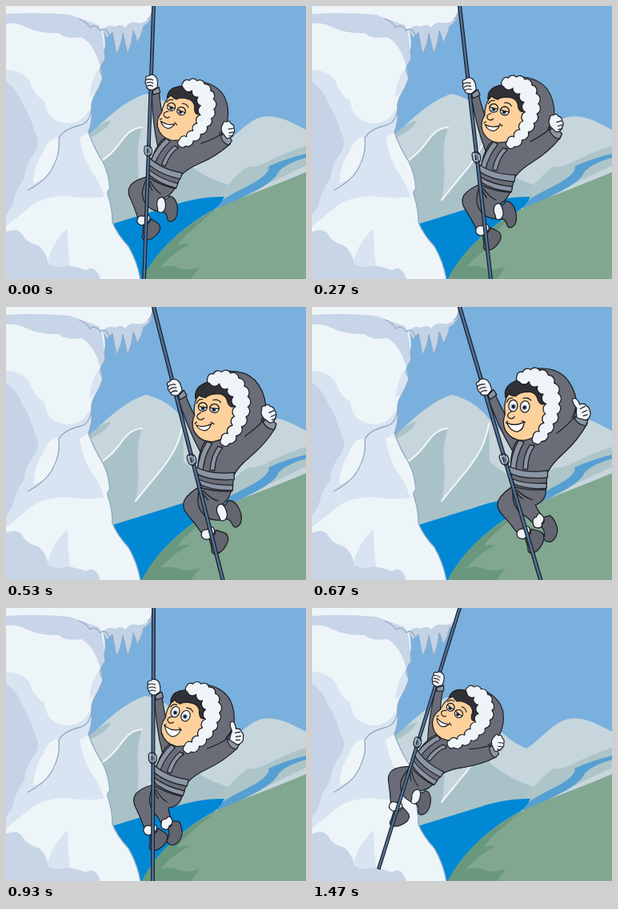
An HTML page that plays this animation: 375 by 342 pixels, repeating every 1600 ms.

```html
<!DOCTYPE html>
<html lang="en">
<head>
<meta charset="utf-8">
<title>Climber on a rope</title>
<style>
html, body { margin: 0; width: 100%; height: 100%; overflow: hidden; background: #7ab0de; }
svg { display: block; width: 100vw; height: 100vh; }
.ink { stroke: #1d1e24; stroke-width: 1.2; stroke-linejoin: round; stroke-linecap: round; }
.suit { fill: #6a6d77; }
.boot { fill: #62656f; }
.trim { fill: #8b95a4; }
.snow { fill: #eef4f8; }
.line { fill: none; }
.skin { fill: #fdd19c; }
</style>
</head>
<body>
<svg viewBox="0 0 375 342">
  <rect width="375" height="342" fill="#7ab0de"/>

  <g id="hills">
    <path fill="#c6d6dc" d="M100 166C122 143 150 117 175 110C197 115 212 128 222 141C236 155 250 169 268 176C287 164 302 143 320 139C341 135 359 147 375 155V260H100Z"/>
    <path fill="#a9c2c7" d="M104 160Q118 147 131 143Q128 154 105 165Z"/>
    <path fill="#a9c2c7" d="M170 152C154 154 145 168 138 178Q130 188 118 195L112 280H170L240 245L264 243L277 224Q246 214 222 194L221 146C217 172 207 187 194 204L162 243Q167 220 165 197Q163 173 170 152Z"/>
    <path fill="#adc5c9" d="M262 243C277 224 291 207 303 201Q311 203 325 196Q350 183 375 175V200L270 250Z"/>
    <path fill="none" stroke="#f3f7fa" stroke-width="2" stroke-linecap="round" d="M170 152C153 153 146 168 139 176Q130 187 118 195M221 146C217 172 207 187 194 204L162 243"/>
    <path fill="#569fd2" d="M262 251C278 234 305 227 322 213Q331 204 328 201Q350 191 375 185V190Q352 196 341 207Q336 220 305 235L266 256Z"/>
    <path fill="#0088d5" d="M130 274L201 252Q239 238 273 239Q268 251 250 263Q203 296 172 342H160Z"/>
    <path fill="#81a791" d="M170 342C187 308 221 276 258 256C298 238 338 224 375 208V342Z"/>
    <path fill="#69987f" d="M170 342C187 308 221 276 261 256Q242 271 226 286Q217 294 215 300Q222 297 230 298Q207 310 193 327Q202 324 213 327Q223 333 242 327Q231 342 231 342Z"/>
  </g>

  <g id="cliff">
    <path fill="#c3d2e5" stroke="#91a9c2" d="M118 26L126 40L133 33Q136 48 138 60Q144 50 146 34Q149 45 152 60Q158 46 159 31Q162 36 164 46Q170 36 172 25Q179 22 183 12L150 5Z"/>
    <path fill="#eef5f9" d="M0 0H183Q184 11 177 17Q172 22 164 21Q154 19 149 27Q144 21 136 26Q128 22 121 30Q125 42 123 55L124 67Q117 76 118 82L121 90Q117 102 113 108Q106 119 107 128Q108 146 103 158Q110 178 121 195Q128 209 130 229Q125 232 128 239Q133 254 133 271Q139 286 153 301Q164 320 168 342H0Z"/>
    <path fill="#c8d5e8" d="M0 10Q36 7 80 11L116 24Q121 32 122 48L124 67L118 76Q110 47 94 39Q74 42 66 34Q42 35 24 26Q12 20 0 22Z"/>
    <path fill="#d9e4f2" d="M118 76L121 90Q117 102 113 108L104 114Q107 88 118 76Z"/>
    <path fill="#d9e4f2" d="M0 80Q18 80 29 93Q35 112 48 119Q49 130 55 138Q66 148 82 147Q98 143 104 130Q108 146 102 159L92 165Q96 190 107 207Q117 220 123 239Q98 242 74 238Q42 239 26 255L0 276Z"/>
    <path fill="#c6d3e6" d="M0 95Q14 104 20 121Q30 136 36 158Q44 171 36 184Q24 199 23 216Q11 232 8 250L0 262Z"/>
    <path fill="#eef5f9" d="M34 222Q36 197 46 184Q52 166 65 164Q67 181 62 198Q51 219 34 222Z"/>
    <path fill="#c8d5e7" d="M0 283Q16 276 22 289Q28 297 40 300Q50 307 53 323Q63 329 72 324Q87 326 100 331Q112 323 118 342H0Z"/>
    <path fill="#d9e4f2" d="M52 322Q55 300 77 278Q77 305 80 324Q62 331 52 322Z"/>
    <path fill="none" stroke="#91a9c2" stroke-width="1.3" d="M91 16Q101 20 105 27Q112 22 118 31Q124 25 129 37M183 0Q184 11 177 17M123 55L124 67Q117 76 118 82L121 90Q117 102 113 108Q106 119 107 128Q108 146 103 158Q110 178 121 195Q128 209 130 229Q125 232 128 239Q133 254 133 271Q139 286 153 301Q164 320 168 342M107 126Q106 145 94 149Q70 155 66 166Q68 183 60 199Q53 217 27 231"/>
  </g>

  <g id="swing">
    <!-- far leg -->
    <g class="ink">
      <path class="boot" d="M181 283Q188 285 191 276L199 281Q205 284 202 292Q195 303 185 304Q178 303 181 296Z"/>
      <path class="suit" d="M190 220Q171 224 163 233Q158 241 163 250Q169 262 174 276L186 272Q184 260 185 248L206 239Z"/>
      <path class="snow" d="M173 277Q175 271 181 273Q185 268 189 273Q191 279 185 281Q181 286 177 284Q172 282 173 277Z"/>
    </g>
    <!-- near leg, hanging or tucked -->
    <g class="ink" id="hanging">
      <path class="boot" d="M203 275Q210 274 208 267L217 267Q221 273 221 283Q219 294 210 297Q203 297 202 291Q207 284 203 275Z"/>
      <path class="suit" d="M186 219Q178 238 181 246Q183 255 190 261L196 271L208 265Q204 256 204 250Q220 249 222 230Z"/>
      <path class="snow" d="M195 270Q195 264 201 264Q205 258 208 264Q211 270 205 273Q204 279 199 277Q194 276 195 270Z"/>
    </g>
    <g class="ink" id="tucked">
      <path class="boot" d="M207 250Q212 250 213 246Q219 245 223 254Q227 267 222 275Q215 282 212 276Q212 269 206 266Z"/>
      <path class="suit" d="M186 219Q176 238 179 248Q183 263 199 266L200 250Q217 247 222 230Z"/>
      <path class="snow" d="M200 249Q206 245 208 252Q211 263 205 267Q198 269 199 262Q196 254 200 249Z"/>
    </g>
    <path class="ink line" d="M188 227Q194 238 202 243"/>
    <!-- raised sleeve, hood and body -->
    <g class="ink">
      <path class="suit" d="M186 111L195 108Q198 132 203 149L213 172L196 181Q188 150 186 111Z"/>
      <path class="suit" d="M246 95Q270 98 280 114Q288 129 285 148L278 163L290 175Q274 191 251 202Q236 209 228 218L221 236Q201 232 185 222Q186 196 198 178Q205 166 219 171Z"/>
      <path class="line" d="M278 163Q266 171 252 176M283 152Q279 159 275 163"/>
      <path class="line" d="M222 181Q210 188 204 204"/>
      <path class="trim" d="M207 171L212 175Q199 187 193 205L188 200Q194 183 207 171Z"/>
      <path class="trim" d="M218 180L223 183Q213 189 207 207L202 205Q207 189 218 180Z"/>
      <path class="trim" d="M185 196Q201 211 229 215L227 223Q198 218 184 204Z"/>
      <path class="trim" d="M184 211Q200 224 224 229L222 235Q198 230 184 217Z"/>
      <path class="line" d="M187 217Q183 226 191 239"/>
    </g>
    <!-- head -->
    <path class="ink skin" d="M209 116Q201 126 200 137Q193 146 195 156Q199 170 213 173Q230 175 243 162Q256 144 250 120Q231 104 209 116Z"/>
    <path class="ink" fill="#303136" d="M206 118Q207 107 217 104Q235 99 249 110Q257 125 249 138Q243 140 242 132Q243 124 236 120Q224 116 218 120Q213 118 211 115Q209 118 206 118Z"/>
    <path id="fur" class="ink snow"/>
    <path class="ink line" d="M206 124Q209 119 214 121M226 125Q232 125 234 130"/>
    <g transform="translate(218.5 132.5) rotate(21)">
      <g id="open" class="ink">
        <ellipse cx="-7" rx="5.2" ry="6.8" fill="#fff"/>
        <ellipse cx="7" rx="5.5" ry="6.8" fill="#fff"/>
        <g stroke="none">
          <circle cx="-6.6" cy="1" r="3" fill="#7892b2"/><circle cx="6.6" cy="1" r="3" fill="#7892b2"/>
          <circle cx="-6.6" cy="1" r="1.8" fill="#17181d"/><circle cx="6.6" cy="1" r="1.8" fill="#17181d"/>
        </g>
      </g>
      <g id="sleepy" class="ink">
        <ellipse cx="-7" rx="5.2" ry="5.2" fill="#fff"/>
        <ellipse cx="7" rx="5.5" ry="5.2" fill="#fff"/>
        <g stroke="none">
          <circle cx="-6.6" cy="1.6" r="2.8" fill="#7892b2"/><circle cx="6.6" cy="1.6" r="2.8" fill="#7892b2"/>
          <circle cx="-6.6" cy="1.6" r="1.7" fill="#17181d"/><circle cx="6.6" cy="1.6" r="1.7" fill="#17181d"/>
        </g>
        <path class="skin" d="M-12.3 0A5.2 5.2 0 0 1 -1.8 0ZM1.5 0A5.5 5.2 0 0 1 12.5 0Z"/>
      </g>
    </g>
    <path class="ink line" d="M208 136Q201 137 203 142Q206 146 210 143"/>
    <path id="grin" class="ink" fill="#fff" d="M199 147Q207 155 219 152Q216 161 208 161Q200 158 199 147Z"/>
    <path id="smile" class="ink" fill="#fff" d="M199 149Q208 155 217 152Q213 158 208 158Q201 156 199 149Z"/>
    <path class="ink line" d="M198 147L200.500 145.500M217 150L220 153"/>
    <!-- waving hand -->
    <path class="ink trim" d="M277 165L285 161L292 171L288 177Q280 175 277 165Z"/>
    <path id="thumb" class="ink snow" d="M280 165Q281 158 283 154Q279 145 282 142Q287 141 288 151Q294 150 295 155Q298 157 297 161Q298 165 295 168Q292 172 288 170Z"/>
    <path id="fist" class="ink snow" d="M279 161Q276 154 279 151Q280 145 284 147Q288 144 290 149Q294 150 294 155Q296 159 293 163Q290 169 285 168Z"/>
    <path class="ink line" d="M287 156L293 155M288 161L294 160M288 165L293 165"/>
    <!-- rope -->
    <rect class="ink" x="182.700" y="-12" width="3.700" height="376" fill="#4f729c"/>
    <path class="ink line" d="M179 184Q179 181 184 181Q189 182 189 188Q189 195 184 195Q178 194 179 184Z"/>
    <path d="M181 186Q182 183 185 184Q187 186 187 190Q184 194 181 191Z" fill="none" stroke="#9aa7b6" stroke-width="1.6"/>
    <path class="ink trim" d="M187 110L195 105L197 112L188 115Z"/>
    <path class="ink snow" d="M178 96Q176 91 181 91Q185 87 190 91Q194 95 193 105L187 109Q179 109 179 104Q176 100 178 96Z"/>
    <path class="ink line" d="M178 96Q182 94 187 96M179 100Q183 98 187 100M180 104Q183 102 187 104"/>
  </g>
</svg>
<script>
const $ = id => document.getElementById(id);
const LOOP = 1600, PIVOT = 184.7;

// Each held pose: start time, swing to the right in degrees, size
const poses = [
  [0, -2, 0.966], [130, 2.2, 0.99], [270, 6.5, 1.015], [400, 10.9, 1.035], [530, 14.2, 1.05],
  [670, 16.5, 1.058], [800, 8.2, 1.03], [930, -0.2, 1], [1070, -17.2, 0.94]
];

// Closed outline made of outward bumps between points
function scallop(pts) {
  let d = `M${pts[0]}`;
  pts.forEach((a, i) => {
    const b = pts[(i + 1) % pts.length];
    const r = 0.6 * Math.hypot(b[0] - a[0], b[1] - a[1]);
    d += `A${r} ${r} 0 0 1 ${b}`;
  });
  return d + 'Z';
}

$('fur').setAttribute('d', scallop([
  [227, 105], [226, 98], [234, 95], [244, 95], [254, 99], [262, 107],
  [266, 118], [267, 131], [264, 143], [259, 154], [251, 164], [242, 173],
  [232, 180], [224, 180], [224, 172], [233, 168], [241, 160], [246, 150],
  [250, 139], [250, 127], [246, 116], [238, 108]
]));

const show = (id, on) => $(id).setAttribute('visibility', on ? 'visible' : 'hidden');

function draw(t) {
  const [, angle, size] = poses.filter(p => p[0] <= t).pop();
  $('swing').setAttribute('transform',
    `translate(${PIVOT} 0) rotate(${-angle}) scale(${size}) translate(${-PIVOT} 0)`);

  const awake = t >= 670 && t < 1470;
  ['open', 'grin', 'thumb', 'hanging'].forEach(id => show(id, awake));
  ['sleepy', 'smile', 'fist', 'tucked'].forEach(id => show(id, !awake));
}

const start = performance.now();
function tick(now) {
  draw(Math.max(0, now - start) % LOOP);
  requestAnimationFrame(tick);
}
draw(0);
requestAnimationFrame(tick);
</script>
</body>
</html>
```
